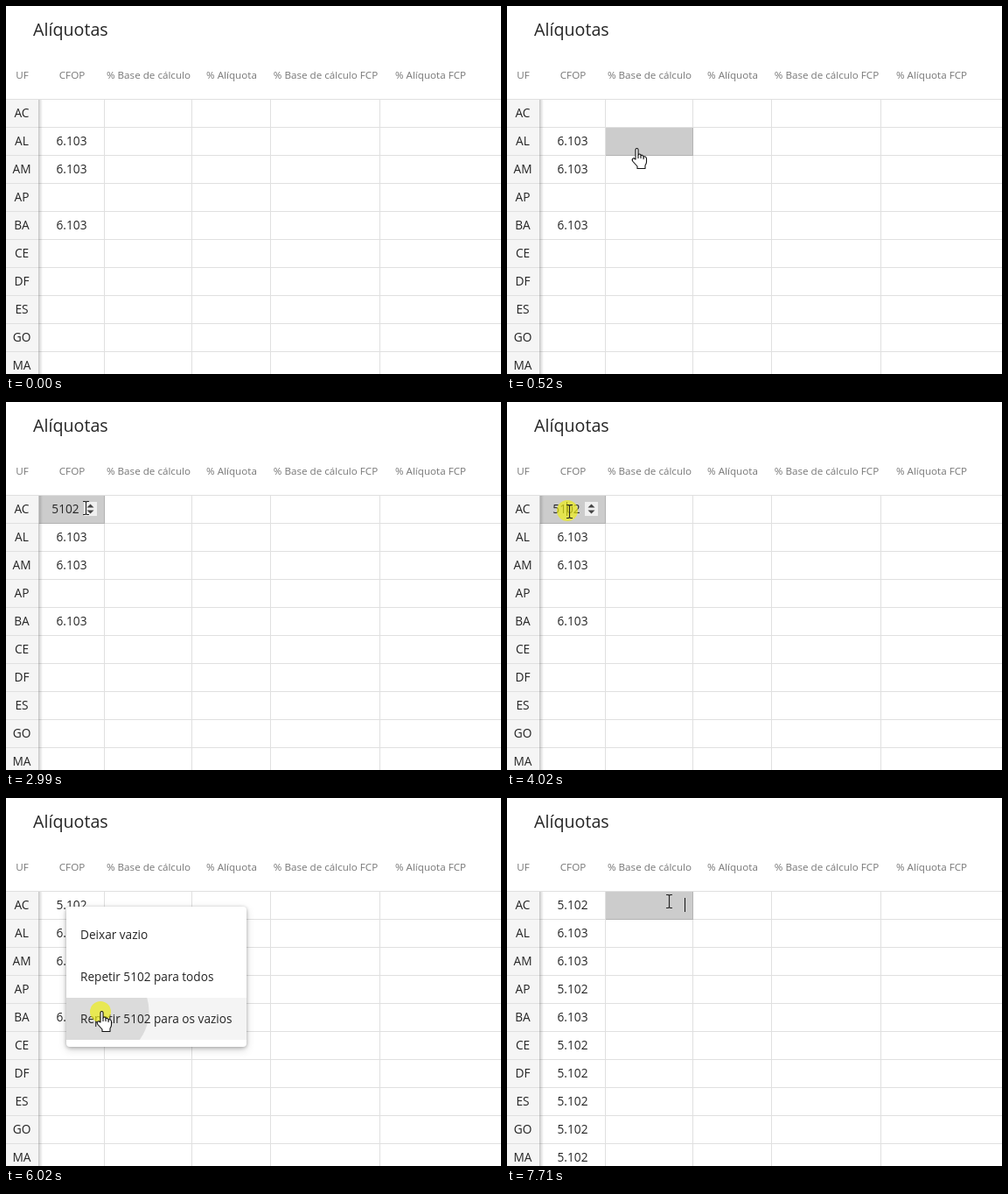
These frames come from a looping animation (566x420 px, 8 s). An HTML page:

```html
<!DOCTYPE html>
<html lang="pt-BR">
<head>
<meta charset="utf-8">
<title>Alíquotas</title>
<style>
  html, body { margin: 0; width: 100%; height: 100%; overflow: hidden; background: #fff; }
  svg { display: block; width: 566px; height: 420px; }
  text { font: 13.7px 'Open Sans', 'Noto Sans', sans-serif; fill: #252525; }
  .title { font-size: 19.7px; }
  .head { font-size: 11.65px; fill: #777; text-anchor: middle; }
  .cell { text-anchor: middle; }
  .item { font-size: 13.62px; }
  .panel { filter: drop-shadow(0 1px 2px rgba(0,0,0,.28)) drop-shadow(0 3px 4px rgba(0,0,0,.16)); }
</style>
</head>
<body>
<svg id="stage" viewBox="0 0 566 420" xmlns="http://www.w3.org/2000/svg">
  <defs>
    <linearGradient id="edge">
      <stop offset="0" stop-color="#000" stop-opacity=".2"/>
      <stop offset="1" stop-color="#000" stop-opacity="0"/>
    </linearGradient>
    <clipPath id="row"><rect x="69" y="228" width="206" height="48"/></clipPath>
  </defs>
  <g id="table"></g>
  <rect id="hover" fill="#000" fill-opacity=".2"/>
  <g id="values"></g>
  <g id="spinner">
    <rect x="89" y="114" width="15" height="16" fill="#f0f0f0"/>
    <path d="M92.5 120.5L96.5 116.5L100.5 120.5ZM92.5 123.5H100.5L96.5 127.5Z" fill="#444"/>
  </g>
  <rect id="caret" y="114" width="1" height="16" fill="#111"/>
  <g id="menu">
    <rect class="panel" x="69" y="124" width="206" height="160" rx="4" fill="#fff"/>
    <rect id="active" x="69" width="206" height="48" fill="#000" fill-opacity=".045"/>
    <circle id="ripple" cx="108.5" cy="243.5" fill="#000" fill-opacity=".1" clip-path="url(#row)"/>
    <g id="items"></g>
  </g>
  <circle id="press" r="12" fill="#eeee11"/>
  <g id="hand" stroke="#111" stroke-width="1.1" stroke-linejoin="round">
    <path fill="#fff" d="M-1.5 13V2Q-1.5 .5 0 .5T1.5 2V8Q1.5 7 3 7T4.5 8.5V9Q4.8 8 6 8.2T7.6 10V10.5Q8 9.6 9.2 9.8T11 12V16Q11 18 9.5 20V23.5H.5V21L-4.5 15.5Q-6 13.5 -4.8 12.3T-2.8 12.2Z"/>
    <path fill="none" d="M1.5 8V12M4.5 9V12M7.6 10.5V13"/>
  </g>
  <path id="arrow" d="M0 0V16L3.7 12.5L6.2 18.4L8.6 17.4L6.1 11.6H11.3Z" fill="#fff" stroke="#111"/>
  <path id="beam" d="M-3.5 -7.5H-1L0 -6.5L1 -7.5H3.5M0 -6.5V6.5M-3.5 7.5H-1L0 6.5L1 7.5H3.5" fill="none" stroke="#222" stroke-width="1.1"/>
</svg>
<script>
const LOOP = 8000, ROW = 32, TOP = 107;
const COLS = [38, 113, 213, 303, 428];
const STATES = ['AC', 'AL', 'AM', 'AP', 'BA', 'CE', 'DF', 'ES', 'GO', 'MA'];
const PRESET = { AL: '6.103', AM: '6.103', BA: '6.103' };
const $ = id => document.getElementById(id);

function add(parent, tag, attrs, text) {
  const el = document.createElementNS('http://www.w3.org/2000/svg', tag);
  for (const k in attrs) el.setAttribute(k, attrs[k]);
  if (text) el.textContent = text;
  parent.appendChild(el);
  return el;
}
const set = (id, attrs) => { for (const k in attrs) $(id).setAttribute(k, attrs[k]); };
const show = (id, on) => { $(id).style.display = on ? '' : 'none'; };
const label = (x, y, cls, text, parent = $('table')) => add(parent, 'text', { x, y, class: cls }, text);
const box = (x, y, width, height, fill) => add($('table'), 'rect', { x, y, width, height, fill });

// Static table
label(31, 34, 'title', 'Alíquotas');
[[18.5, 'UF'], [75.5, 'CFOP'], [163, '% Base de cálculo'], [258, '% Alíquota'],
 [365.5, '% Base de cálculo FCP'], [485.5, '% Alíquota FCP']]
  .forEach(([x, s]) => label(x, 83, 'head', s));
box(0, TOP, 38, 313, '#f5f5f5');
for (let i = 0; i <= STATES.length; i++) box(0, TOP - 1 + i * ROW, 566, 1, '#e0e0e0');
COLS.slice(1).forEach(x => box(x - 1, TOP - 1, 1, 314, '#e0e0e0'));
box(37, TOP, 5, 313, 'url(#edge)');
const values = STATES.map((s, i) => {
  label(18, 127 + i * ROW, 'cell', s);
  return label(75, 127 + i * ROW, 'cell', '', $('values'));
});
['Deixar vazio', 'Repetir 5102 para todos', 'Repetir 5102 para os vazios']
  .forEach((s, i) => label(85, 161 + i * 48, 'item', s, $('items')));

const step = (t, a, b, n) => Math.min(n - 1, Math.floor((t - a) / (b - a) * (n - 1) + 0.1));
const mix = (a, b, u) => a + (b - a) * u;
const smooth = u => u * u * (3 - 2 * u);
const out = (u, p) => 1 - Math.pow(1 - u, p);

function pointer(t) {
  if (t < 70) return null;
  if (t < 900) {
    const u = step(t, 70, 820, 11) / 10;
    return { kind: 'hand', x: mix(459, 98, out(u, 2.16)), y: mix(400, 129, out(u, 2.3)) };
  }
  if (t < 970) return { kind: 'hand', x: 93, y: 124 };
  if (t < 1215) return { kind: 'hand', x: 89, y: 120 };
  if (t < 3310) return { kind: 'beam', x: 91, y: 121 };
  if (t < 4095) {
    const u = smooth((step(t, 3310, 3710, 6) + 1) / 6);
    return { kind: 'beam', x: mix(91, 71, u), y: mix(121, 125, u) };
  }
  if (t < 4640) return { kind: 'arrow', x: 70, y: 125 };
  if (t < 6790) {
    const u = smooth((step(t, 4640, 5410, 11) + 1) / 11);
    const y = mix(125, 243, u);
    return { kind: y < 132 ? 'arrow' : 'hand', x: mix(70, 109, u), y };
  }
  if (t < 7710) {
    const u = (step(t, 6790, 7560, 11) + 1) / 11;
    return { kind: 'hand', x: mix(109, 178, out(u, 1.955)), y: mix(243, 117, out(u, 1.16)) };
  }
  return { kind: 'beam', x: 185, y: 118 };
}

function typed(t) {
  return '5102'.slice(0, [2070, 2150, 2230, 2460].filter(at => t >= at).length);
}

// Caret position, or null while it is blinked off
function caretX(t, text) {
  if (t >= 7710) return 203;
  if (t >= 4020 && t < 4095) return 68;
  const on = (t >= 1215 && t < 1750) || (t >= 2070 && t < 2990) || (t >= 3520 && t < 4020);
  return on ? 68 + Math.round(text.length * 3.9) : null;
}

function press(t) {
  const taps = [[1140, 90, 121], [4020, 69, 124], [6020, 108, 244]];
  const tap = taps.find(([at]) => t >= at && t < at + 150);
  if (tap) set('press', { cx: tap[1], cy: tap[2], 'fill-opacity': t < tap[0] + 75 ? .68 : .35 });
  show('press', tap);
}

function drawMenu(t, p) {
  const open = t >= 4095 && t < 6252;
  show('menu', open);
  if (!open) return;
  const k = step(t, 4020, 4320, 5);
  const scale = k < 2 ? .9 : 1;
  const alpha = k < 2 ? .55 : t >= 6175 ? .5 : 1;
  set('menu', { opacity: alpha, transform: `translate(69 124) scale(${scale}) translate(-69 -124)` });
  const item = Math.floor((p.y - 132) / 48);
  show('active', item >= 0);
  set('active', { y: 132 + item * 48 });
  show('ripple', t >= 6020);
  set('ripple', { r: 55 + 65 * Math.max(0, step(t, 6020, 6330, 5)) });
}

function drawHover(t, p) {
  const editing = t >= 1140 && t < 4095;
  const blocked = !p || (t >= 4095 && t < 6252);
  const col = blocked ? -1 : COLS.findIndex((x, i) => i < 4 && p.x >= x && p.x < COLS[i + 1]);
  show('hover', editing || col >= 0);
  if (!editing && col < 0) return;
  const c = editing ? 0 : col;
  const r = editing ? 0 : Math.floor((p.y - TOP) / ROW);
  set('hover', { x: COLS[c], y: TOP + r * ROW, width: COLS[c + 1] - COLS[c], height: ROW });
}

function draw(t) {
  const p = pointer(t), text = typed(t), edit = t < 4095, filled = t >= 6252;
  STATES.forEach((s, i) => {
    values[i].textContent = PRESET[s] || (filled || (i === 0 && !edit) ? '5.102' : '');
  });
  if (edit) values[0].textContent = text;
  values[0].setAttribute('x', edit ? 68 : 75);
  drawHover(t, p);
  show('spinner', t >= 1215 && edit);
  const cx = caretX(t, text);
  show('caret', cx !== null);
  if (cx !== null) set('caret', { x: cx });
  drawMenu(t, p);
  press(t);
  for (const kind of ['hand', 'arrow', 'beam']) {
    const on = p && p.kind === kind;
    show(kind, on);
    if (on) set(kind, { transform: `translate(${Math.round(p.x) + .5} ${Math.round(p.y)})` });
  }
}

const start = performance.now();
function tick() {
  draw((performance.now() - start) % LOOP);
  requestAnimationFrame(tick);
}
tick();
</script>
</body>
</html>
```
